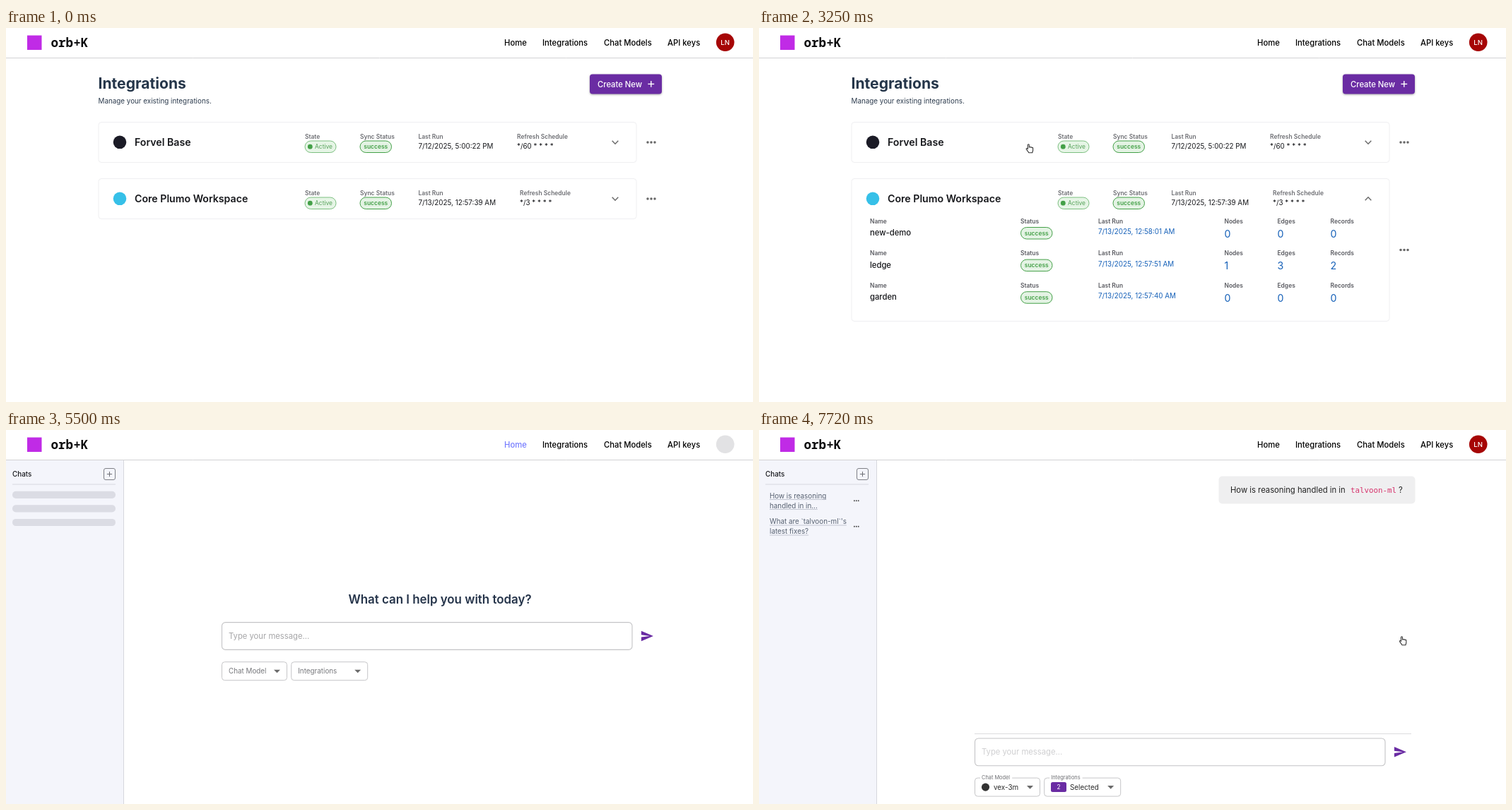
Animation of 1057x530 px, one loop 8 s. Source, as an HTML page with a canvas:

```html
<!DOCTYPE html>
<html lang="en">
<head>
<meta charset="utf-8">
<title>Integrations</title>
<style>
html, body { margin: 0; width: 100%; height: 100%; overflow: hidden; background: #fff; }
canvas { display: block; width: 1057px; height: 530px; }
</style>
</head>
<body>
<canvas id="stage"></canvas>
<script>
const W = 1057, H = 530, LOOP = 8000;
const canvas = document.getElementById('stage');
const dpr = window.devicePixelRatio || 1;
canvas.width = W * dpr;
canvas.height = H * dpr;
const c = canvas.getContext('2d');

const SANS = 'Inter, "Open Sans", sans-serif';
const LOGO = '"Noto Sans Mono", "DejaVu Sans Mono", monospace';
const CODE = '"DejaVu Sans Mono", "Liberation Mono", monospace';
const PURPLE = '#6a2ca3', GREEN = '#43a047', BLUE = '#1560b8', INK = '#17181c';
const LG = 14.15, MD = 11.26, SM = 9.86, XS = 8.45;

// Times of the story, in ms
const OPEN_CHAT = 1205, OPEN_CODE = 3500, GO_HOME = 5500, LOADED = 5640;
const FOCUS = 6240, PASTE = 6740, SEND = 7560;

const QUERY = 'How is reasoning handled in in ';
const REPO = 'talvoon-ml';

const clamp = v => Math.max(0, Math.min(1, v));

// cubic-bezier(0.4, 0, 0.2, 1)
function ease(x) {
  x = clamp(x);
  let lo = 0, hi = 1;
  for (let i = 0; i < 24; i++) {
    const s = (lo + hi) / 2, q = 1 - s;
    if (1.2 * s * q * q + 0.6 * s * s * q + s * s * s < x) lo = s; else hi = s;
  }
  return lo * lo * (3 - 2 * lo);
}

// y is the middle of the capitals
function text(str, x, y, size, color = INK, weight = 400, font = SANS, align = 'left') {
  c.font = `${weight} ${size}px ${font}`;
  c.textAlign = align;
  c.fillStyle = color;
  c.fillText(str, x, y + size * 0.364);
  return c.measureText(str).width;
}

function box(x, y, w, h, r, fill, stroke, lw = 1) {
  c.beginPath();
  c.roundRect(x, y, w, h, r);
  if (fill) { c.fillStyle = fill; c.fill(); }
  if (stroke) { c.strokeStyle = stroke; c.lineWidth = lw; c.stroke(); }
}

function disc(x, y, r, fill) {
  c.beginPath();
  c.arc(x, y, r, 0, Math.PI * 2);
  c.fillStyle = fill;
  c.fill();
}

function line(points, color, lw = 1) {
  c.beginPath();
  points.forEach(([x, y], i) => i ? c.lineTo(x, y) : c.moveTo(x, y));
  c.strokeStyle = color;
  c.lineWidth = lw;
  c.stroke();
}

function plus(x, y, r, color, lw) {
  line([[x - r, y], [x + r, y]], color, lw);
  line([[x, y - r], [x, y + r]], color, lw);
}

function dots(x, y, gap, r, color) {
  for (let i = -1; i < 2; i++) disc(x + i * gap, y, r, color);
}

/* Header */

function header(t, cur) {
  c.fillStyle = '#fff';
  c.fillRect(0, 0, W, 42);
  line([[0, 42.5], [W, 42.5]], '#d2d2d4');
  box(30, 10.5, 20.5, 20.5, 0, '#c02be6');
  text('orb+K', 63.5, 20.5, 17.6, '#0c0c0e', 600, LOGO);
  const hover = cur && cur.x > 700 && cur.x < 742 && cur.y < 34;
  const landing = t >= GO_HOME && t < GO_HOME + 60;
  text('Home', 705, 20.5, MD, hover || landing ? '#747bff' : '#000', 500);
  text('Integrations', 759, 20.5, MD, '#000', 500);
  text('Chat Models', 846, 20.5, MD, '#000', 500);
  text('API keys', 936, 20.5, MD, '#000', 500);
  if (t >= GO_HOME && t < LOADED) {
    disc(1017.7, 20.3, 12.8, '#e2e2e4');
  } else {
    disc(1017.7, 20.3, 12.8, '#a60606');
    text('LN', 1017.7, 20.5, 9.6, '#fff', 500, SANS, 'center');
  }
}

/* Integrations page */

const cards = [
  {
    title: 'Forvel Main'.replace('Main', 'Base'), mark: '#1b1b26', start: OPEN_CODE, grow: 132.5,
    run: '7/12/2025, 5:00:22 PM', cron: '*/60 * * * *', cronX: 723,
    rows: [
      ['TalvoonLB/' + REPO, '7/12/2025, 5:00:23 PM', 11, 11, 16],
      ['kdorvane72/parsing_seg', '7/12/2025, 5:00:33 PM', 0, 0, 0],
      ['kdorvane72/orb-k', '7/12/2025, 5:00:45 PM', 4, 4, 4]
    ]
  },
  {
    title: 'Core Plumo Workspace', mark: '#36c0e8', start: OPEN_CHAT, grow: 145,
    run: '7/13/2025, 12:57:39 AM', cron: '*/3 * * * *', cronX: 727,
    rows: [
      ['new-demo', '7/13/2025, 12:58:01 AM', 0, 0, 0],
      ['ledge', '7/13/2025, 12:57:51 AM', 1, 3, 2],
      ['garden', '7/13/2025, 12:57:40 AM', 0, 0, 0]
    ]
  }
];

const cardHeight = (card, t) => 57 + card.grow * ease((t - card.start) / 300);
const cardTop = (i, t) => i ? 156.5 + cardHeight(cards[0], t) : 133.5;

const label = (str, x, y, color = '#6c6d72') => text(str, x, y, XS, color, 600);

function successChip(x, y) {
  box(x + 0.5, y - 8, 44.5, 16.5, 8.25, '#e4f3e4', GREEN);
  text('success', x + 22.7, y + 0.2, XS, GREEN, 600, SANS, 'center');
}

function activeChip(x, y) {
  box(x + 0.5, y - 8, 44, 16.5, 8.25, '#e6f5e6', '#7cbf80');
  disc(x + 7.8, y + 0.2, 3.4, GREEN);
  text('Active', x + 14.5, y + 0.2, XS, '#57a35b', 400);
}

function details(card, top) {
  card.rows.forEach(([name, run, ...counts], i) => {
    const y = top + 60 + i * 45.6;
    label('Name', 157, y, '#595a60');
    text(name, 157, y + 16.5, MD, INK, 500);
    label('Status', 370, y, '#595a60');
    successChip(370, y + 17);
    label('Last Run', 480, y, '#595a60');
    text(run, 480, y + 15, SM, BLUE);
    counts.forEach((n, k) => {
      const x = 658.5 + 75 * k;
      label(['Nodes', 'Edges', 'Records'][k], x, y, '#595a60');
      text(n, x, y + 18, LG, BLUE);
    });
  });
}

function drawCard(i, t) {
  const card = cards[i], top = cardTop(i, t), h = cardHeight(card, t);
  box(131, top, 761, h, 4, '#fff', '#efeff1');
  disc(161, top + 28.3, 9.3, card.mark);
  text(card.title, 182, top + 28.3, LG, INK, 600);
  label('State', 423, top + 20);
  activeChip(422.5, top + 34.5);
  label('Sync Status', 501, top + 20);
  successChip(500.5, top + 34.5);
  label('Last Run', 583.5, top + 20);
  text(card.run, 583.5, top + 33.5, SM);
  label('Refresh Schedule', card.cronX, top + 20);
  text(card.cron, card.cronX, top + 33.5, SM);

  c.save();
  c.translate(862, top + 28.5);
  c.rotate(Math.PI * ease((t - card.start) / 150));
  line([[-4.3, -2.2], [0, 2.2], [4.3, -2.2]], '#6b6b6b', 1.5);
  c.restore();
  dots(913, top + h / 2, 5, 1.75, '#666');

  const alpha = clamp((t - card.start - 80) / 100);
  if (alpha > 0) {
    c.save();
    c.beginPath();
    c.rect(131, top, 761, h - 1);
    c.clip();
    c.globalAlpha = alpha;
    details(card, top);
    c.restore();
  }
}

function integrationsPage(t) {
  text('Integrations', 130.5, 78.5, 21.1, '#25364a', 700);
  text('Manage your existing integrations.', 130.5, 103.5, SM, '#2d3c4e');
  c.save();
  c.shadowColor = 'rgba(0,0,0,.35)';
  c.shadowBlur = 3 * dpr;
  c.shadowOffsetY = dpr;
  box(826, 65.5, 102, 28, 4, PURPLE);
  c.restore();
  text('Create New', 837, 79.5, MD, '#fff', 500);
  plus(912.8, 79.4, 4.4, '#fff', 1.4);
  drawCard(0, t);
  drawCard(1, t);
}

/* Chat pages */

function chatItem(lines, y) {
  lines.forEach((str, i) => {
    const ly = y + i * 14;
    const w = text(str, 15, ly, SM, '#566070');
    line([[15, ly + 5.5], [15 + w, ly + 5.5]], '#b4b9c6', 0.8);
  });
  dots(137.8, y + 7.2, 2.9, 0.95, '#444');
}

function sidebar(t) {
  c.fillStyle = '#f4f5fb';
  c.fillRect(0, 43, 166, H);
  line([[166.5, 43], [166.5, H]], '#d6d7dd');
  text('Chats', 9, 62.8, SM, INK, 500);
  box(138.5, 54.5, 16, 16, 2.5, null, '#7e8086');
  plus(146.5, 62.5, 3.6, '#6c6e74', 1);
  line([[9, 77], [155, 77]], '#d6d8e0');
  if (t < LOADED) {
    for (let i = 0; i < 3; i++) box(9, 86.7 + i * 19.6, 146, 10.2, 5, '#dbdce4');
    return;
  }
  const old = ['What are `' + REPO + '`\'s', 'latest fixes?'];
  if (t >= SEND) chatItem(['How is reasoning', 'handled in in...'], 93);
  chatItem(old, t >= SEND ? 129.5 : 93);
}

function select(x, w, y, name, filled) {
  box(x + 0.5, y - 13, w, 26, 4, null, '#c6c6c8');
  c.beginPath();
  c.moveTo(x + w - 18, y - 2);
  c.lineTo(x + w - 9, y - 2);
  c.lineTo(x + w - 13.5, y + 2.6);
  c.fillStyle = '#6a6a6a';
  c.fill();
  if (!filled) {
    text(name, x + 10, y + 0.2, SM, '#77787c');
    return;
  }
  c.font = `400 7.4px ${SANS}`;
  c.fillStyle = '#fff';
  c.fillRect(x + 8, y - 15, c.measureText(name).width + 5, 4);
  text(name, x + 10, y - 14.2, 7.4, '#6f7074');
}

function composer(t, dy) {
  const sent = t >= SEND;
  const focused = t >= FOCUS && !sent;
  const mid = 291.9 + dy;
  box(305.5, mid - 19.3, 580.5, 38.8, 5, '#fff', focused ? PURPLE : '#c4c4c6', focused ? 1.6 : 1.1);
  if (t >= PASTE && !sent) {
    const w = text(QUERY + '`' + REPO + '`?', 315, mid, MD, '#222');
    caret(t - PASTE, 315 + w, mid);
  } else {
    text('Type your message...', 315, mid, MD, sent ? '#cfcfd1' : '#a6a6a8');
    if (focused) caret(t - FOCUS, 315, mid);
  }

  c.save();
  c.translate(897.3, mid - 9.7);
  c.scale(0.81, 0.81);
  c.fillStyle = PURPLE;
  c.fill(new Path2D('M2 21 23 12 2 3v7l15 2-15 2z'));
  c.restore();

  const y = 341.7 + dy, filled = t >= LOADED + 60;
  select(305, 92, y, 'Chat Model', filled);
  select(403.2, 108, y, 'Integrations', filled);
  if (!filled) return;
  disc(320.5, y, 5.6, '#333');
  text('vex-3m', 332, y + 0.2, SM, '#2a2a2a');
  box(413, y - 7.2, 22, 14.2, 2.5, PURPLE);
  text('2', 424, y, XS, '#fff', 400, SANS, 'center');
  text('Selected', 440, y + 0.2, SM, '#2a2a2a');
}

function caret(age, x, y) {
  if (Math.floor(age / 500) % 2 === 0) line([[x + 0.5, y - 7], [x + 0.5, y + 7]], '#222');
}

function chatPage(t) {
  sidebar(t);
  if (t < SEND) {
    text('What can I help you with today?', 614, 240, 16.9, '#25344a', 600, SANS, 'center');
    composer(t, 0);
    return;
  }
  box(650.5, 65.5, 278, 39, 5, '#efeff0');
  text(QUERY, 667, 85, MD, '#222');
  text(REPO, 837, 85, 10.8, '#d6336c', 400, CODE);
  text('?', 905, 85, MD, '#222');
  line([[305, 430.5], [923, 430.5]], '#dcdcde');
  composer(t, 164.4);
}

/* Pointer */

const moves = [
  [0, 870, 352.5, 256],
  [1800, 2540, 382.8, 171],
  [4200, 4900, 722, 25],
  [5560, 6100, 433, 287],
  [6920, 7450, 911, 299]
];

function pointer(t) {
  if (t < 80 || (t >= GO_HOME && t < GO_HOME + 50)) return null;
  let x = 450, y = 470;
  for (const [from, to, mx, my] of moves) {
    const k = ease((t - from) / (to - from));
    x += (mx - x) * k;
    y += (my - y) * k;
  }
  return { x, y };
}

function pointerKind({ x, y }, t) {
  if (y < 34 || t >= SEND) return 'hand';
  if (t < GO_HOME) {
    const over = [0, 1].some(i => {
      const top = cardTop(i, t);
      return x > 131 && x < 892 && y > top && y < top + 57;
    });
    return over ? 'hand' : 'arrow';
  }
  if (y > 272 && y < 312 && x > 305) return x < 886 ? 'beam' : 'hand';
  return 'arrow';
}

const shapes = {
  hand: new Path2D('M-2.5-5.2c0-1.4 2-1.4 2 0v3.4c.3-.9 1.8-.8 1.9.1.4-.8 1.7-.6 1.8.3.5-.6 1.6-.3 1.6.7v3.2c0 1-.7 1.6-.8 3.2h-5.2c-.4-1.7-2-2.9-3.3-4.9-.6-1 .7-1.8 1.5-.9l.5.6z'),
  arrow: new Path2D('M-3-6v11l2.6-2.4 1.7 3.8 1.8-.8-1.7-3.7h3.4z'),
  beam: new Path2D('M-2-5q2 0 2 1.5v7q0 1.5-2 1.5M2-5q-2 0-2 1.5v7q0 1.5 2 1.5')
};

function drawPointer(cur, t) {
  const kind = pointerKind(cur, t);
  c.save();
  c.translate(cur.x, cur.y);
  c.lineJoin = 'round';
  if (kind !== 'beam') {
    c.fillStyle = kind === 'hand' ? '#fff' : '#111';
    c.fill(shapes[kind]);
  }
  c.strokeStyle = kind === 'arrow' ? '#fff' : '#333';
  c.lineWidth = kind === 'hand' ? 1.1 : 0.9;
  c.stroke(shapes[kind]);
  c.restore();
}

function draw(t) {
  c.setTransform(dpr, 0, 0, dpr, 0, 0);
  c.fillStyle = '#fff';
  c.fillRect(0, 0, W, H);
  const cur = pointer(t);
  if (t < GO_HOME) integrationsPage(t); else chatPage(t);
  header(t, cur);
  if (cur) drawPointer(cur, t);
}

const begin = performance.now();
function tick() {
  draw((performance.now() - begin) % LOOP);
  requestAnimationFrame(tick);
}
tick();
</script>
</body>
</html>
```
